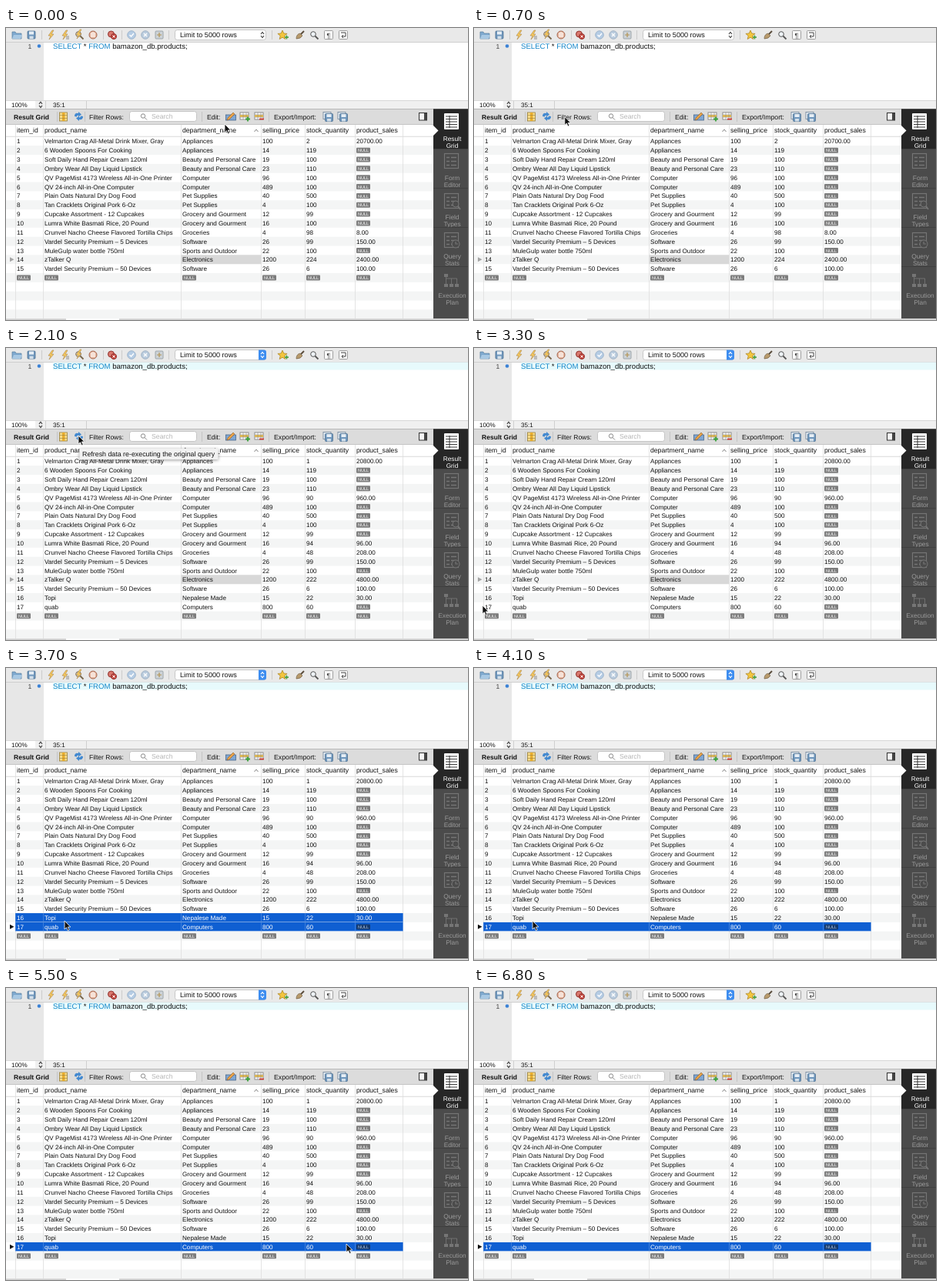
An HTML page that plays this animation: 600x380 px, repeating every 7500 ms.

```html
<!DOCTYPE html>
<html lang="en">
<head>
<meta charset="utf-8">
<title>Query result grid</title>
<style>
  html, body { margin: 0; height: 100%; overflow: hidden; background: #fff; }
  svg { display: block; width: 600px; height: 380px; font-family: "Liberation Sans", Arial, sans-serif; text-rendering: geometricPrecision; }
  .tip { filter: drop-shadow(0 1.5px 2px #0006); }
</style>
</head>
<body>
<svg viewBox="0 0 600 380"><g id="chrome"></g><g id="grid"></g><g id="overlay"></g></svg>
<script>
const LOOP = 7500, STEP = 100;
const REFRESH = 1000, SELECT_TWO = 3500, SELECT_ONE = 4100, POINTER_GONE = 6400;
const ROW_TOP = 141.3, ROW_H = 11.85;
const INK = '#111', DIM = '#757575';
const columns = [12, 48, 227, 331, 388, 453, 515];
const headers = ['item_id', 'product_name', 'department_name', 'selling_price', 'stock_quantity', 'product_sales'];

// name | department | price | stock | sales
const products = `Velmarton Crag All-Metal Drink Mixer, Gray|Appliances|100|1|20800.00
6 Wooden Spoons For Cooking|Appliances|14|119|
Soft Daily Hand Repair Cream 120ml|Beauty and Personal Care|19|100|
Ombry Wear All Day Liquid Lipstick|Beauty and Personal Care|23|110|
QV PageMist 4173 Wireless All-in-One Printer|Computer|96|90|960.00
QV 24-inch All-in-One Computer|Computer|489|100|
Plain Oats Natural Dry Dog Food|Pet Supplies|40|500|
Tan Cracklets Original Pork 6-Oz|Pet Supplies|4|100|
Cupcake Assortment - 12 Cupcakes|Grocery and Gourment|12|99|
Lumra White Basmati Rice, 20 Pound|Grocery and Gourment|16|94|96.00
Crunvel Nacho Cheese Flavored Tortilla Chips|Groceries|4|48|208.00
Vardel Security Premium – 5 Devices|Software|26|99|150.00
MuleGulp water bottle 750ml|Sports and Outdoor|22|100|
zTalker Q|Electronics|1200|222|4800.00
Vardel Security Premium – 50 Devices|Software|26|6|100.00
Topi|Nepalese Made|15|22|30.00
quab|Computers|800|60|`.split('\n').map((line, i) => [i + 1, ...line.split('|')]);

// Stock and sales before the refresh
const earlier = { 1: ['2', '20700.00'], 5: ['100', ''], 10: ['100', ''], 11: ['98', '8.00'], 14: ['224', '2400.00'] };

// Pointer path: time, x, y
const pointerPath = [
  [0, 284, 125], [800, 94, 114], [2200, 94, 114], [2600, 24, 331], [3000, 11, 335],
  [3300, 11, 335], [3700, 76, 329], [4600, 76, 329], [4800, 208, 329], [5400, 438, 332], [5500, 442, 333]
];

const el = id => document.getElementById(id);
const rect = (x, y, w, h, fill, extra = '') => `<rect x="${x}" y="${y}" width="${w}" height="${h}" fill="${fill}" ${extra}/>`;
const path = (d, fill, stroke = 'none', width = 1) => `<path d="${d}" fill="${fill}" stroke="${stroke}" stroke-width="${width}"/>`;
const circle = (x, y, r, fill, stroke = 'none') => `<circle cx="${x}" cy="${y}" r="${r}" fill="${fill}" stroke="${stroke}"/>`;
const text = (x, y, s, size, fill = INK, extra = '') => `<text x="${x}" y="${y}" font-size="${size}" fill="${fill}" ${extra}>${s}</text>`;
const vline = (x, y, h, color) => rect(x, y, 1, h, color);
const bolt = (x, y) => path(`M${x + 2} ${y - 6}l-5 7h3l-2 5 6-7h-3l3-5z`, '#f7c95c', '#a8854a', .6);
const lens = (x, y, color) => circle(x - 1, y - 1, 3.3, '#eef3f7', color) + path(`M${x + 1.5} ${y + 1.5}l4 4`, 'none', color, 1.8);
const floppy = (x, y) => rect(x - 5, y - 5, 10, 10, '#6f97bd', 'rx="1" stroke="#4d6f90" stroke-width=".8"') +
  rect(x - 3, y - 4.5, 6, 4, '#e6eef5') + rect(x - 2.5, y + 1.5, 5, 3.5, '#d3dfea');
const sheet = (x, y) => rect(x - 6, y - 5, 11, 9, '#fff', 'stroke="#777" stroke-width=".8"') +
  rect(x - 6, y - 2, 11, 3, '#edc04a') + path(`M${x - 6} ${y - 2}h11M${x - 6} ${y + 1}h11M${x - 2} ${y - 5}v9M${x + 2} ${y - 5}v9`, 'none', '#8a8a8a', .6);
const stepper = (x, y, color) => path(`M${x - 2} ${y - 1}l2-2.6 2 2.6M${x - 2} ${y + 1}l2 2.6 2-2.6`, 'none', color, 1.2);

function topBar(active) {
  let s = rect(0, 0, 600, 18, '#e9e9e9') + rect(0, 18, 600, .8, '#c4c4c4');
  s += path('M8 5h4l1 2h7v7H8z', '#7fa9cf', '#5a7f9f', .7) + path('M8 14l2-5h11l-2 5z', '#a8c8e3') + floppy(33, 9);
  s += bolt(58, 9) + bolt(76, 9) + path('M79 10v5M81 10v5', 'none', '#777', .8) + lens(95, 9, '#77654a') + bolt(94, 8);
  s += circle(113, 9, 5, '#e9b79f', '#a3664f') + path('M111 6v6M113 5v7M115 6v6', 'none', '#fff', 1.2);
  s += circle(136.5, 8, 4, '#d9796f', '#8f2f2a') + circle(140, 11, 3.5, '#c9483f', '#8f2f2a') + path('M138.500 9.500l3 3M141.500 9.500l-3 3', 'none', '#fff');
  s += circle(163, 9, 5.3, '#b5cce4', '#9db5cd') + path('M160.5 9l2 2 3.5-4', 'none', '#fff', 1.4);
  s += circle(181, 9, 5.3, '#b9cbdd', '#a3b4c6') + path('M179 7l4 4M183 7l-4 4', 'none', '#fff', 1.4);
  s += rect(194, 4, 10, 10, '#cdd3d8', 'rx="1" stroke="#8f979e" stroke-width=".8"') + path('M196 9h6m-3-3v6', 'none', '#b3924f', 1.2);
  s += [46, 126, 150, 211, 345].map(x => vline(x, 3, 12, '#cbcbcb')).join('');
  s += rect(219.5, 2.5, 118, 13, '#fff', 'rx="3" stroke="#bcbcbc" stroke-width=".8"') + text(226, 12.2, 'Limit to 5000 rows', 9.1);
  if (active) s += path('M328 2.5h7q3 0 3 3v7q0 3-3 3h-7z', '#3d8df0');
  s += stepper(333, 9, active ? '#fff' : '#444');
  s += path('M359 3l1.8 4 4.3.4-3.3 2.8 1 4.3-3.8-2.3-3.8 2.3 1-4.3-3.3-2.8 4.3-.4z', '#f3c63f', '#a67d1b', .7) + path('M362 12h5M364.500 9.500v5', 'none', '#3e9a35', 1.3);
  s += path('M377 14q0-6 5-7l3 3q-2 4-8 4z', '#b89a6c', '#6f5d43', .7) + path('M383 8l4-4', 'none', '#5a4c3c', 2) + lens(400, 9, '#555');
  for (const x of [413.5, 432.5]) s += rect(x, 3.5, 11, 11, '#fafafa', 'rx="1" stroke="#8a8a8a" stroke-width=".8"');
  return s + text(416.5, 12.5, '¶', 9, '#444') + path('M435 6h6v5h-5m2-2l-2 2 2 2', 'none', '#444');
}

function editor(active) {
  let s = rect(0, 19, 49, 75, '#e7e7e7') + rect(49, 19, 551, 75, '#fff');
  if (active) s += rect(61, 18.5, 539, 10, '#e7fafc');
  s += text(28.5, 26.5, '1', 8.6, '#444') + circle(43, 23.5, 2.3, '#3b82d6');
  s += text(61, 26.6, '<tspan fill="#1486c9">SELECT</tspan> * <tspan fill="#1486c9">FROM</tspan> bamazon_db.products;', 9.6);
  s += rect(0, 94, 600, 11.5, '#f0f0f0') + rect(0, 94, 600, .8, '#d2d2d2') + rect(0, 95, 38, 9.5, '#fff');
  s += text(7, 102.8, '100%', 8.1) + stepper(45, 99.8, '#444') + vline(51, 95, 10, '#cfcfcf');
  return s + text(61, 102.8, '35:1', 8.1) + vline(104, 95, 10, '#cfcfcf');
}

function gridBar() {
  let s = rect(0, 105.5, 556, 20.5, '#dcdcdc') + rect(0, 105, 600, .8, '#adadad') + rect(0, 125.3, 556, .8, '#bdbdbd');
  s += text(10, 118.6, 'Result Grid', 8.55, INK, 'font-weight="bold"');
  s += rect(69.5, 110, 10, 11, '#f8dc8a', 'stroke="#97803f" stroke-width=".8"') + rect(73, 110, 3.5, 11, '#e9ad2c') + path('M69.500 113.500h10M69.500 117.500h10', 'none', '#97803f', .6);
  s += path('M89 115q0-5 5-4v-2l4 3.5-4 3v-2q-2 0-2 2z', '#4289d0') + path('M100 115q0 5-5 4v2l-4-3.5 4-3v2q2 0 2-2z', '#4289d0');
  s += text(108, 118.6, 'Filter Rows:', 8.5) + rect(160.5, 108.5, 87, 13, '#fff', 'rx="3" stroke="#bbb" stroke-width=".8"');
  s += circle(178, 114.5, 2.7, 'none', '#888') + path('M180 116.500l3 3', 'none', '#888') + text(189, 118.4, 'Search', 8.7, '#b5b5b5');
  s += text(261, 118.6, 'Edit:', 8.7) + rect(285.5, 113, 13, 7, '#7fa6d3', 'stroke="#49688c" stroke-width=".8"') + path('M288 117l7-7 2 2-7 7-3 1z', '#e9a34a', '#8c5a22', .6);
  s += sheet(310, 115) + path('M311 118.500h6M314 115.500v6', 'none', '#39a03b', 1.8) + sheet(329, 115) + path('M329 118.500h6', 'none', '#cf3a32', 1.8);
  s += text(348, 118.6, 'Export/Import:', 8.75);
  for (const x of [418, 437]) s += rect(x - 6, 109.5, 10, 9, '#e6edf3', 'stroke="#6d8298" stroke-width=".8"') + floppy(x + 1.5, 116.5);
  s += [66, 102, 254, 341].map(x => vline(x, 109, 13, '#c4c4c4')).join('');
  return s + rect(536.5, 110.5, 10, 9.5, '#f5f5f5', 'stroke="#333"') + rect(543, 111, 3.5, 9, '#444');
}

function sidebar() {
  const centered = (y, s, color) => text(579.5, y, s, 8.3, color, 'text-anchor="middle"');
  const labels = [['Result', 'Grid'], ['Form', 'Editor'], ['Field', 'Types'], ['Query', 'Stats'], ['Execution', 'Plan']];
  const frame = y => rect(569.5, y, 18, 19, 'none', `stroke="${DIM}" stroke-width="1.2"`);
  const lines = y => path(`M572 ${y + 5}h4M578 ${y + 5}h7M572 ${y + 10}h4M578 ${y + 10}h7M572 ${y + 15}h4M578 ${y + 15}h7`, 'none', DIM, 1.6);
  let s = rect(555, 105.5, 45, 272.5, '#4b4b4b') + rect(555, 105.5, 45, 51.5, '#262626') + path('M555 127l6.500 6.500-6.500 6.500z', '#fff');
  labels.forEach((pair, i) => {
    const y = 147 + i * 51, color = i ? '#9b9b9b' : '#fff';
    s += centered(y, pair[0], color) + centered(y + 9, pair[1], color);
    if (i) s += rect(555, y - 41, 45, .8, '#3c3c3c');
  });
  s += rect(569, 111, 19, 21, '#fff', 'rx="1"') + path('M571 115h15M571 118.500h15M571 122h15M571 125.500h15M571 129h15M576 114v16', 'none', '#262626', .9);
  s += frame(163.5) + lines(163.5) + frame(215.5) + lines(215.5) + circle(584, 229, 4, '#4b4b4b', DIM) + path('M587 232l3 4', 'none', DIM, 1.8);
  s += frame(266.5) + lines(266.5) + circle(584, 281, 5, '#4b4b4b', DIM) + path('M584 278v3h3', 'none', DIM, 1.2);
  s += path('M571.500 323v11M571.500 326h14v8M578.500 326v8', 'none', DIM, .9);
  return s + [[569, 320], [569, 333], [576, 333], [583, 333]].map(([x, y]) => rect(x, y, 5, 4, DIM)).join('');
}

const nullBadge = (x, y, selected) => rect(x + 2, y + 2.5, 18, 7, selected ? '#143a70' : '#7d7d7d', 'rx="1"') +
  text(x + 11, y + 8.1, 'NULL', 5.5, selected ? '#b9cbe4' : '#fff', 'text-anchor="middle"');

function drawGrid(fresh, selected) {
  const rows = fresh ? products : products.slice(0, 15).map(r => earlier[r[0]] ? [...r.slice(0, 4), ...earlier[r[0]]] : r);
  let s = rect(0, 126, 555, 252, '#fff');
  for (let i = 1; i < 20; i += 2) s += rect(0, ROW_TOP + i * ROW_H, 555, ROW_H, '#f4f5f5');
  s += rect(0, 140.8, 555, .8, '#cfcfcf') + columns.map(x => rect(x, 126, .8, 252, '#dedede')).join('');
  headers.forEach((h, i) => s += text(columns[i] + 2, 136.2, h, 8.65));
  s += path('M322.500 135l2.500-3 2.500 3', 'none', '#777', .9);

  rows.forEach((row, i) => {
    const y = ROW_TOP + i * ROW_H, on = selected.includes(row[0]);
    if (on) {
      s += rect(12, y, 503.5, ROW_H - .4, '#0f5fd2');
      s += columns.map(x => rect(x, y, .6, ROW_H - .4, '#5a91df')).join('');
    } else if (row[0] === 14 && !selected.length) s += rect(227.5, y, 103.5, ROW_H, '#d8d8d8');
    row.forEach((v, c) => s += v === '' ? nullBadge(columns[c], y, on) : text(columns[c] + 2, y + 9, v, 8.15, on ? '#fff' : INK));
  });
  for (const x of columns.slice(0, 6)) s += nullBadge(x, ROW_TOP + rows.length * ROW_H, false);

  const mark = ROW_TOP + ((selected.length ? 17 : 14) - .5) * ROW_H;
  return s + path(`M5 ${mark - 3}l5.500 3-5.500 3z`, selected.length ? INK : '#a5a5a5');
}

function pointerAt(t) {
  const next = pointerPath.findIndex(p => p[0] > t);
  if (next < 0) return pointerPath.at(-1).slice(1);
  const [t0, x0, y0] = pointerPath[next - 1], [t1, x1, y1] = pointerPath[next];
  const k = (t - t0) / (t1 - t0);
  return [x0 + (x1 - x0) * k, y0 + (y1 - y0) * k];
}

function drawOverlay(t) {
  let s = '';
  if ((t >= 1000 && t < 1600) || (t >= 2200 && t < 2800)) s += rect(236, 19, 1, 9.5, INK);
  if (t >= 1900 && t < 2400) {
    s += rect(95.5, 131, 180, 14, '#f1f1f1', 'class="tip"');
    s += text(99, 141.1, 'Refresh data re-executing the original query', 8.85);
  }
  if (t < POINTER_GONE) {
    const [x, y] = pointerAt(t);
    s += path(`M${x} ${y}v11l2.500-2.300 1.800 4 1.900-.9-1.800-3.800h3.400z`, INK, '#fff', .8);
  }
  return s;
}

function drawChrome(active) {
  return topBar(active) + editor(active) + gridBar() + sidebar() +
    rect(0, 378, 600, 2, '#d0d0d0') + rect(78, 378, 69, 2, '#fff');
}

const painted = {};
function paint(id, markup) {
  if (painted[id] !== markup) el(id).innerHTML = painted[id] = markup;
}

let lastTick = -1;
function frame(now) {
  const t = Math.floor(now % LOOP / STEP) * STEP;
  if (t !== lastTick) {
    lastTick = t;
    const fresh = t >= REFRESH;
    paint('chrome', drawChrome(fresh));
    paint('grid', drawGrid(fresh, t < SELECT_TWO ? [] : t < SELECT_ONE ? [16, 17] : [17]));
    paint('overlay', drawOverlay(t));
  }
  requestAnimationFrame(frame);
}
frame(0);
</script>
</body>
</html>
```
